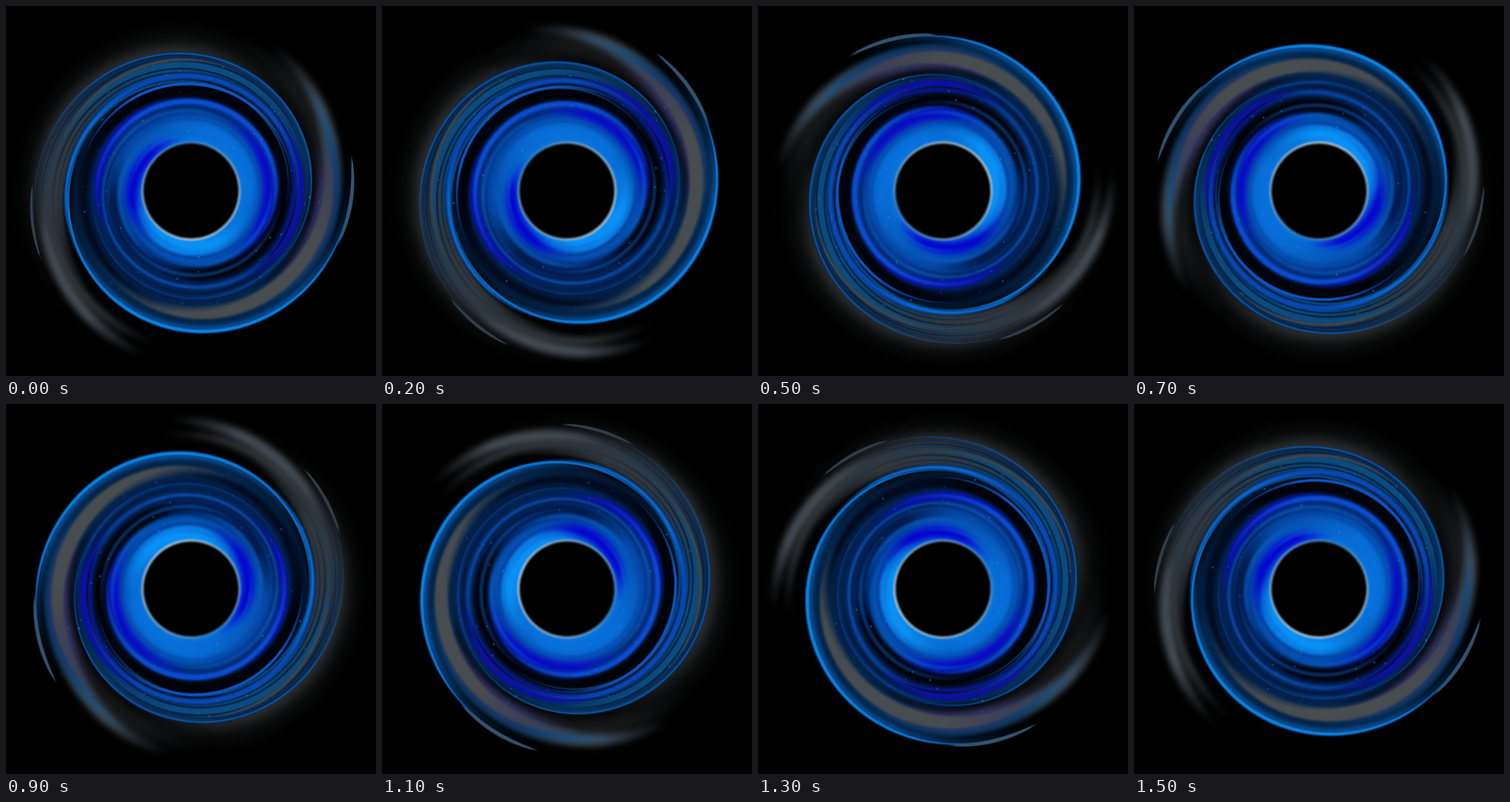
Write an HTML page with a canvas that moves like this. It is 500 by 500 pixels and loops after 1600 ms.

```html
<!DOCTYPE html>
<html lang="en">
<head>
<meta charset="utf-8">
<title>Black hole</title>
<style>
  html, body { margin: 0; width: 100%; height: 100%; overflow: hidden; background: #000; }
  canvas { display: block; width: 500px; height: 500px; animation: spin 1.6s steps(16) infinite; }
  @keyframes spin { to { transform: rotate(-360deg); } }
</style>
</head>
<body>
<canvas id="disc" width="500" height="500"></canvas>
<script>
const ctx = document.getElementById('disc').getContext('2d');
const TAU = Math.PI * 2;
const rad = deg => deg * Math.PI / 180;

let seed = 11;
const rnd = (lo = 0, hi = 1) => {
  seed = (seed * 16807) % 2147483647;
  return lo + (hi - lo) * seed / 2147483647;
};

// Tapered spiral ribbon: starts at angle a (clockwise from the right), radius r.
function band(a, r, sweep, w, color, { soft = 0, k = 0.085, fade = 0.3, alpha = 1 } = {}) {
  const start = rad(a), span = rad(sweep), steps = 120;
  const edge = (i, side) => {
    const t = i / steps, q = start + span * t;
    const half = w / 2 * Math.pow(Math.sin(Math.PI * t) + 1e-6, 0.6);
    const d = r * Math.exp(-k * span * t) + side * half;
    ctx.lineTo(d * Math.cos(q), d * Math.sin(q));
  };
  const g = ctx.createConicGradient(start, 0, 0);
  const end = span / TAU;
  g.addColorStop(0, color + '00');
  g.addColorStop(end * fade, color);
  g.addColorStop(end * (1 - fade), color);
  g.addColorStop(end, color + '00');
  ctx.beginPath();
  for (let i = 0; i <= steps; i++) edge(i, 1);
  for (let i = steps; i >= 0; i--) edge(i, -1);
  ctx.closePath();
  ctx.globalAlpha = alpha;
  ctx.filter = soft ? `blur(${soft}px)` : 'none';
  ctx.fillStyle = g;
  ctx.fill();
  ctx.filter = 'none';
  ctx.globalAlpha = 1;
}

function circle(r, fill) {
  ctx.beginPath();
  ctx.arc(0, 0, r, 0, TAU);
  ctx.fillStyle = fill;
  ctx.fill();
}

function halo() {
  band(100, 214, 240, 40, '#101112', { soft: 12, k: 0.03 });
  band(125, 207, 200, 30, '#2c2f32', { soft: 7, k: 0.05 });
  band(-75, 208, 100, 30, '#17191b', { soft: 9, k: 0.1 });
}

function wisps() {
  band(-62, 226, 95, 19, '#3e4852', { soft: 4, k: 0.17 });
  band(-48, 214, 80, 7, '#1d568c', { soft: 3, k: 0.15 });
  band(104, 231, 85, 17, '#444c54', { soft: 4, k: 0.13 });
  band(100, 212, 85, 10, '#34383c', { soft: 4, k: 0.08 });
}

function arms() {
  band(-12, 196, 210, 46, '#042448', { soft: 1.5 });
  band(150, 196, 260, 46, '#062440', { soft: 1.5 });
  band(-35, 205, 110, 18, '#0a3c6c', { soft: 4 });

  band(-28, 189, 90, 26, '#30305e', { soft: 5, k: 0.07 });
  band(-35, 195, 185, 19, '#474c50', { soft: 1.5, k: 0.08 });
  band(136, 194, 125, 32, '#30363c', { soft: 2.5, k: 0.05 });
  band(200, 181, 190, 21, '#0b4a7e', { soft: 2, k: 0.06 });
}

function core() {
  const g = ctx.createRadialGradient(0, 0, 65, 0, 0, 165);
  ['#0a78dc', '#0866cc', '#0756b8', '#064aa8', '#053a8c', '#032660', '#031a40', '#04224a', '#06284e00']
    .forEach((c, i, all) => g.addColorStop(i / (all.length - 1), c));
  circle(165, g);

  band(140, 154, 270, 22, '#01030a', { soft: 2.5, k: 0.05 });
  band(-50, 134, 200, 21, '#010208', { soft: 3, k: 0.07 });
  band(75, 115, 140, 22, '#021a4a', { soft: 5, k: 0.05 });
  band(100, 157, 120, 10, '#020b1e', { soft: 2, k: 0.06 });
  band(205, 118, 125, 8, '#03205c', { soft: 3, k: 0.05 });

  band(-130, 93, 190, 24, '#0872de', { soft: 6, alpha: 0.8 });
  band(15, 82, 160, 22, '#0a90f4', { soft: 4, k: 0.06 });
  band(122, 87, 145, 17, '#0602cc', { soft: 4, k: 0.09 });
  band(-72, 109, 140, 16, '#0a06c8', { soft: 4, k: 0.025 });
}

function stripes() {
  // outer arm
  for (let i = 0; i < 10; i++) {
    band(rnd(150, 185), 209 - i * 4.2, rnd(190, 250), rnd(2, 4),
      i % 2 ? '#0b4c80' : '#041c38', { soft: 0.6, k: 0.075, alpha: 0.85 });
  }
  band(190, 188, 130, 4, '#42494f', { soft: 0.8, k: 0.04 });

  // under the grey crescent
  for (let i = 0; i < 7; i++) {
    band(rnd(-20, 30), 160 - i * 4.5, rnd(190, 240), rnd(3, 5),
      i % 2 ? '#0848a4' : '#04204c', { soft: 0.8, k: 0.055 });
  }

  // fine swirl around the hole
  for (let i = 0; i < 14; i++) {
    band(rnd(0, 360), rnd(78, 124), rnd(90, 200), rnd(2, 6),
      i % 2 ? '#0a68d4' : '#043490', { soft: 1.5, k: 0.05, alpha: 0.5 });
  }

  band(-50, 151, 115, 15, '#0c10a4', { soft: 2, k: 0.045 });
  band(-55, 149, 120, 3, '#031034', { soft: 0.7, k: 0.045 });
  band(148, 126, 115, 10, '#0c0cb4', { soft: 2, k: 0 });
  band(165, 129, 235, 7, '#0a4cd0', { soft: 1, k: 0.035 });
  band(165, 170, 220, 7, '#0848b4', { soft: 1, k: 0.05 });
  band(190, 152, 165, 4, '#0a54c4', { soft: 0.7, k: 0.035 });
}

function edges() {
  band(-12, 216, 195, 9, '#06488c', { soft: 2 });
  band(-13, 220, 230, 4, '#0870cc', { soft: 0.7, fade: 0.2 });
  band(20, 210, 140, 3, '#0a88e4', { soft: 0.8 });
  band(140, 177, 110, 4, '#0870e0', { soft: 0.8, k: 0.07 });
  band(154, 220, 280, 2.5, '#0a50a0', { soft: 0.5 });
  band(158, 213, 220, 3, '#052a5c', { soft: 0.6 });
  band(-13, 222, 34, 5, '#35526e', { soft: 0.7, fade: 0.1 });
  band(155, 223, 28, 4, '#343e48', { soft: 0.7, fade: 0.1 });
}

function sparks() {
  for (let i = 0; i < 80; i++) {
    const q = rnd(0, TAU), d = rnd(80, 175);
    ctx.globalAlpha = rnd(0.15, 0.5);
    ctx.beginPath();
    ctx.arc(d * Math.cos(q), d * Math.sin(q), rnd(0.5, 1.4), 0, TAU);
    ctx.fillStyle = '#38a4f0';
    ctx.fill();
  }
  ctx.globalAlpha = 1;
}

function hole() {
  const g = ctx.createConicGradient(rad(-90), 0, 0);
  g.addColorStop(0, '#4a90d8');
  g.addColorStop(0.25, '#c4dcec');
  g.addColorStop(0.5, '#f0f8ff');
  g.addColorStop(0.72, '#a8c8e4');
  g.addColorStop(1, '#4a90d8');
  ctx.filter = 'blur(1.5px)';
  circle(66.5, g);
  circle(64.5, '#000');
  ctx.filter = 'none';
}

ctx.translate(250, 250);
[halo, wisps, arms, core, stripes, edges, sparks, hole].forEach(draw => draw());
</script>
</body>
</html>
```
